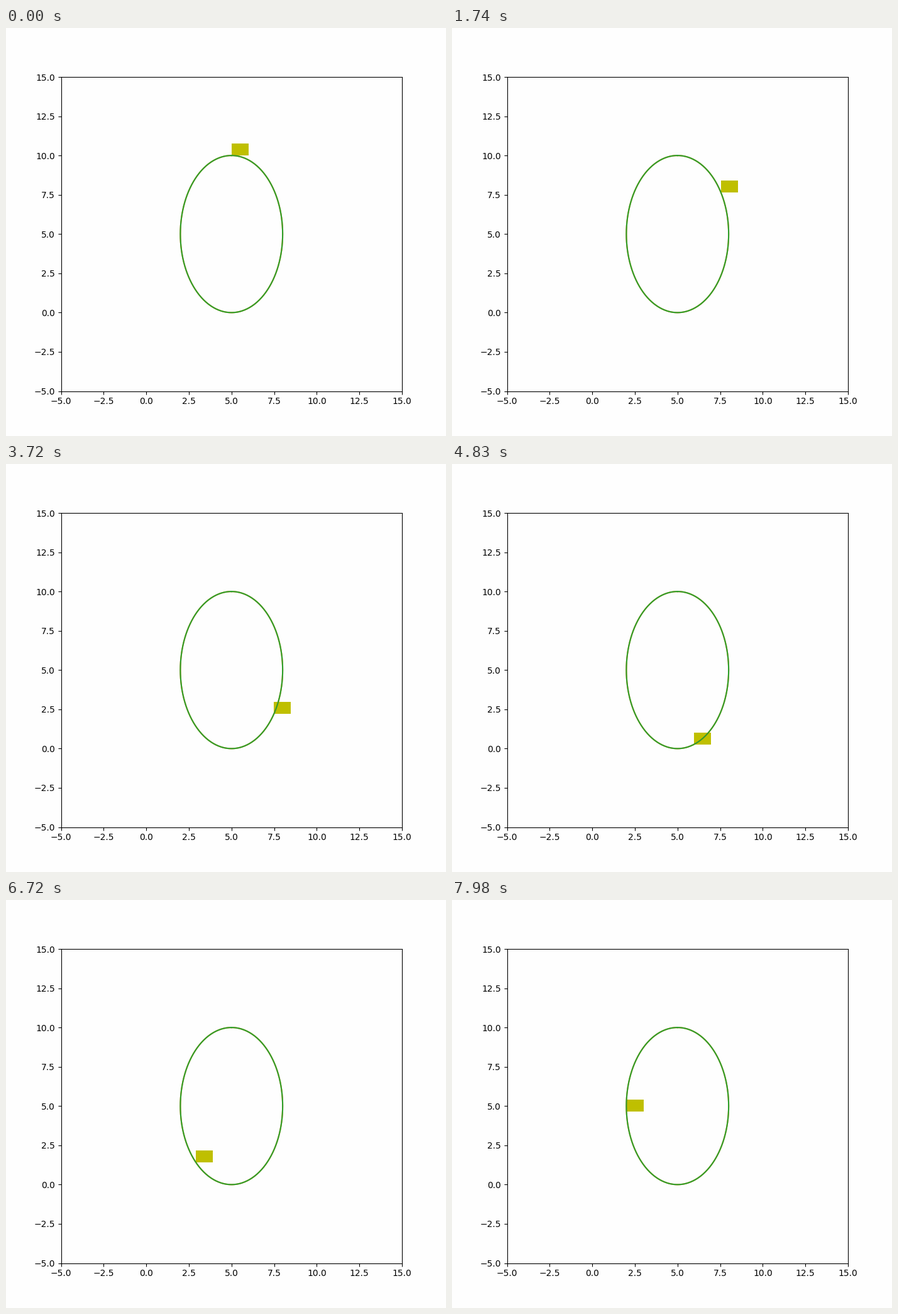
Animation, 700 px wide and 650 px high, one loop 8000 ms. Source, as a matplotlib script:

```python
import numpy as np
import matplotlib.pyplot as plt
from matplotlib.animation import FuncAnimation
from matplotlib.patches import Rectangle

CENTER = 5.0
RX, RY = 3.0, 5.0
LOOP_MS, TICK_MS, STEP_MS = 8000, 20, 30


def on_ellipse(deg):
    """Point on the ellipse, clockwise from the top."""
    a = np.radians(deg)
    return CENTER + RX * np.sin(a), CENTER + RY * np.cos(a)


fig, ax = plt.subplots(figsize=(7, 6.5), dpi=100, facecolor="#fefefe")
ax.set_facecolor("#fefefe")
ax.set_xlim(-5, 15)
ax.set_ylim(-5, 15)

path = on_ellipse(np.arange(361))
for color in ("tab:orange", "tab:green"):
    ax.plot(*path, color=color, linewidth=1.5)

box = ax.add_patch(Rectangle(on_ellipse(0), 1, 0.75, facecolor="y"))


def update(i):
    # One degree per 30 ms step, rounded to the 20 ms tick.
    step = (i * TICK_MS + TICK_MS // 2) // STEP_MS
    box.set_xy(on_ellipse(step))
    return (box,)


anim = FuncAnimation(fig, update, frames=LOOP_MS // TICK_MS,
                     interval=TICK_MS, repeat=True, repeat_delay=0,
                     blit=False)
plt.show()
```
